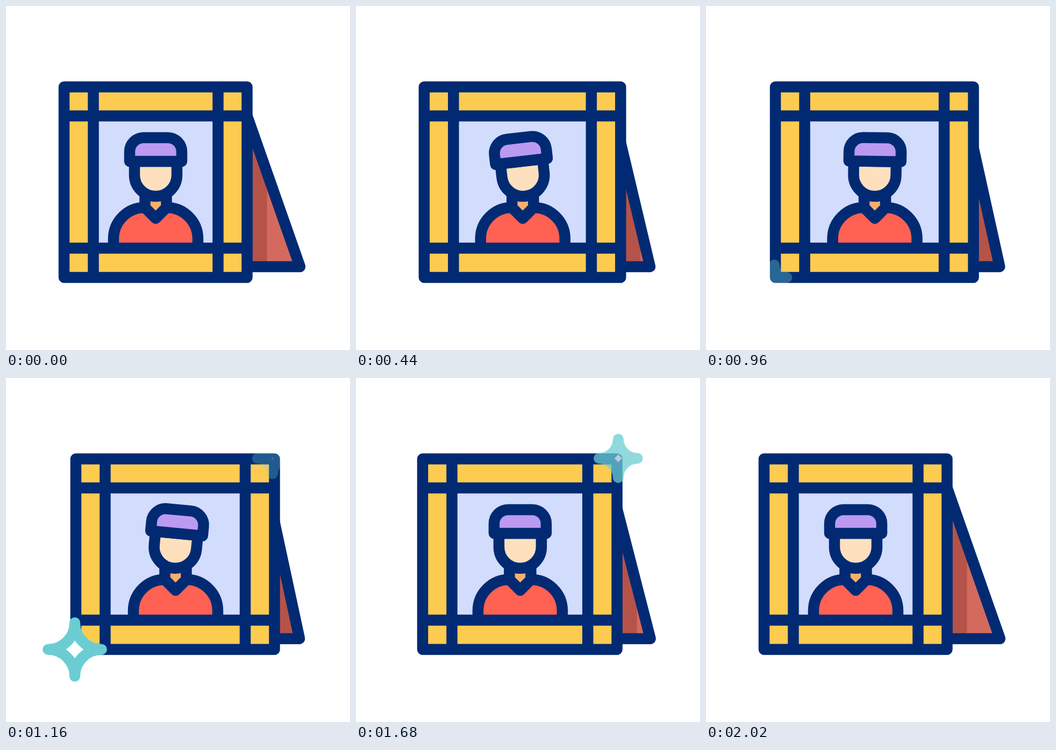
An HTML page with a canvas that plays this animation: 640x640 px, repeating every 2400 ms.

```html
<!DOCTYPE html>
<html lang="en">
<head>
<meta charset="utf-8">
<title>Photo frame</title>
<style>
  html, body { margin: 0; height: 100%; overflow: hidden; background: #fff; }
  canvas { display: block; width: 100%; height: 100%; object-fit: contain; }
</style>
</head>
<body>
<canvas id="stage" width="640" height="640"></canvas>
<script>
const ctx = document.getElementById('stage').getContext('2d');
const LOOP = 2400;
const NAVY = '#022a73', GOLD = '#fdcb50', TEAL = '#6bcdd2';
const linear = u => u;
const smooth = u => u * u * (3 - 2 * u);

// Keys are [time, value, easing into this key].
function track(keys, t) {
  if (t <= keys[0][0]) return keys[0][1];
  for (let i = 1; i < keys.length; i++) {
    const [t0, v0] = keys[i - 1], [t1, v1, ease = smooth] = keys[i];
    if (t < t1) return v0 + (v1 - v0) * ease((t - t0) / (t1 - t0));
  }
  return keys[keys.length - 1][1];
}

const TURN = [[120, 0], [460, 44.2], [1160, 51, linear], [1460, 56.6, linear], [2020, 0]];
const TILT = [[240, 0], [640, -13], [1120, 5.5], [1580, 0]];
const SPARKS = [
  { size: [[920, 22], [1300, 62], [1670, 22]], fade: [925, 1025, 1486, 1586] },
  { size: [[1130, 27], [1440, 76], [1770, 27]], fade: [1132, 1232, 1656, 1756] }
];

function shape(d, fill) {
  const path = new Path2D(d);
  if (fill) {
    ctx.fillStyle = fill;
    ctx.fill(path);
  }
  ctx.stroke(path);
}

function box(x0, y0, x1, y1, fill) {
  ctx.fillStyle = fill;
  ctx.fillRect(x0, y0, x1 - x0, y1 - y0);
}

function stand(right, turn) {
  const foot = 547 + 0.12 * turn - 0.0027 * turn * turn;
  const apex = 448.5 + 0.73 * turn;
  const d = `M${apex} 204.5L${foot} 485H${apex}Z`;
  ctx.save();
  ctx.clip(new Path2D(d));
  box(apex, 200, 570, 490, '#d46a5d');
  box(apex, 200, 485.5 + turn, 490, '#b55348');
  ctx.restore();
  shape(d);
}

// The portrait is drawn around x = 0.
function portrait(x, tilt) {
  ctx.save();
  ctx.translate(x, 0);
  shape('M-78.5 450V433a58 58 0 0 1 58-58H20.5a58 58 0 0 1 58 58V450', '#ff6152');
  shape('M-20 350V375L0 395L20 375V350Z', '#f7b06b');
  ctx.translate(0, 310);
  ctx.rotate(tilt * Math.PI / 180);
  ctx.translate(0, -310);
  shape('M-39.5 289V314.5a39.5 39.5 0 0 0 79 0V289Z', '#fee0be');
  shape('M-48.5 289V271a26 26 0 0 1 26-26H22.5a26 26 0 0 1 26 26V289Z', '#bb9af2');
  ctx.restore();
}

function spark({ size, fade }, x, y, t) {
  const [in0, in1, out0, out1] = fade;
  const alpha = Math.min((t - in0) / (in1 - in0), (out1 - t) / (out1 - out0), 1);
  if (alpha <= 0) return;
  const r = track(size, t);
  const arc = `A${r} ${r} 0 0 0 `;
  const d = `M0 ${-r}${arc}${r} 0${arc}0 ${r}${arc}${-r} 0${arc}0 ${-r}Z`;
  const layer = new OffscreenCanvas(200, 200);
  const c = layer.getContext('2d');
  const star = new Path2D(d);
  c.translate(100, 100);
  c.lineWidth = 20;
  c.lineJoin = 'round';
  c.fillStyle = '#fff';
  c.strokeStyle = TEAL;
  c.fill(star);
  c.stroke(star);
  ctx.save();
  ctx.globalAlpha = alpha;
  // Faint sparkles only show over the artwork.
  if (alpha < 0.45) ctx.globalCompositeOperation = 'source-atop';
  ctx.drawImage(layer, x - 100, y - 100);
  ctx.restore();
}

function draw(t) {
  const turn = track(TURN, t);
  const left = 108 + 0.43 * turn, right = 448.5 + turn;
  const inLeft = left + 54.5, inRight = 394.5 + 0.99 * turn;

  ctx.clearRect(0, 0, 640, 640);
  ctx.lineWidth = 20.5;
  ctx.lineJoin = 'round';
  ctx.strokeStyle = NAVY;

  stand(right, turn);
  box(left, 150.5, right, 505, GOLD);
  box(inLeft, 204.5, inRight, 450.5, '#d2dcfd');
  portrait(278.5 + 0.725 * turn, track(TILT, t));
  box(inLeft, 451, inRight, 505, GOLD);
  shape(`M${left} 150.5H${right}V505H${left}Z
    M${inLeft} 150.5V505M${inRight} 150.5V505
    M${left} 204.5H${right}M${left} 450.5H${right}`);

  spark(SPARKS[0], left - 2, 505, t);
  spark(SPARKS[1], right + (t - 1480) / 90, 149.5, t);
}

function tick() {
  draw(performance.now() % LOOP);
  requestAnimationFrame(tick);
}
tick();
</script>
</body>
</html>
```
